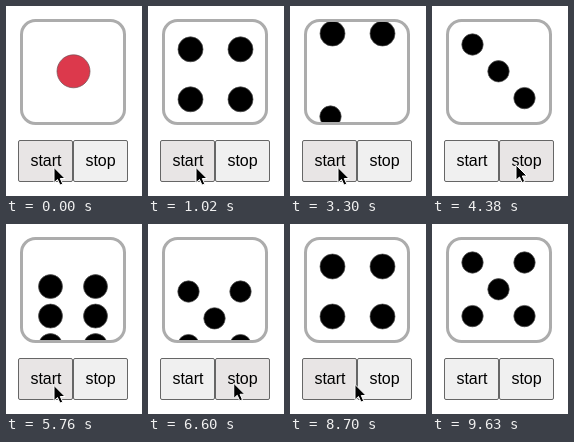
Write an HTML page that moves like this. It is 136 px wide and 190 px high and loops after 9.66 s.

```html
<!DOCTYPE html>
<html lang="en">
<head>
<meta charset="utf-8">
<title>Dice roller</title>
<style>
  html, body { margin: 0; width: 100%; height: 100%; overflow: hidden; background: #fff; }
  svg { position: absolute; left: 0; top: 0; display: block; }
  text { font: 16px "Liberation Sans", Arial, sans-serif; fill: #000; }
  .button { fill: #f0f0f0; stroke: #666; }
  .button.hover { fill: #e8e5e5; }
</style>
</head>
<body>
<svg width="136" height="190" viewBox="0 0 136 190">
  <defs>
    <clipPath id="window"><rect x="17" y="16" width="100" height="100" rx="12"/></clipPath>
  </defs>
  <rect x="15.5" y="14.5" width="103" height="103" rx="14" fill="#fff" stroke="#acacac" stroke-width="3"/>
  <g clip-path="url(#window)"><g id="strip"></g></g>
  <rect id="start" class="button" x="12.5" y="134.5" width="54" height="41" rx="1.5"/>
  <rect id="stop" class="button" x="67.5" y="134.5" width="54" height="41" rx="1.5"/>
  <text x="24.4" y="160">start</text>
  <text x="79.4" y="160">stop</text>
  <path id="cursor" d="M0 0V15.2L3.5 12L6 17.6L8.7 16.4L6.3 11H11Z" fill="#000" stroke="#fff" stroke-linejoin="round"/>
</svg>
<script>
const LOOP = 9660, GAP = 137, SPIN = 1000;
const HOME = { x: 48, y: 161.5 };
const $ = id => document.getElementById(id);
const strip = $('strip'), cursor = $('cursor');

// Each roll: start and stop times, resulting face, pointer x on stop, time it leaves.
const rolls = [
  { start: 520, stop: 2010, face: 6, reach: 102, leave: 2180 },
  { start: 2880, stop: 3840, face: 3, reach: 84, leave: 4390 },
  { start: 4899, stop: 6800, face: 2, reach: 90, leave: 7000 },
  { start: 7796, stop: 8500, face: 4, reach: 90, leave: 8560 },
  { start: 8970, stop: 9450, face: 5, reach: 92, leave: 9460 }
];

const mix = (a, b, k) => a + (b - a) * k;
function ease(t, from, length) {
  const k = Math.min(1, Math.max(0, (t - from) / length));
  return k * k * (3 - 2 * k);
}

// Pip positions as steps away from the middle of the face.
function pips(n) {
  const list = [];
  if (n % 2) list.push([0, 0]);
  if (n > 1) list.push([-1, -1], [1, 1]);
  if (n > 3) list.push([1, -1], [-1, 1]);
  if (n === 6) list.push([-1, 0], [1, 0]);
  return list;
}

const plain = { x: 66.5, y: 65.3, dx: 26, dy: 26.8, r: 10.7 };
const layouts = {
  1: { ...plain, x: 67.5, r: 16.5 },
  4: { x: 67.5, y: 67.5, dx: 25, dy: 25, r: 12.5 },
  6: { x: 67, y: 68.5, dx: 22.5, dy: 29.5, r: 12 }
};

function addFace(n, level) {
  const { x, y, dx, dy, r } = layouts[n] || plain;
  const [fill, stroke] = n === 1 ? ['#dc394c', '#6f5055'] : ['#000', '#555'];
  for (const [i, j] of pips(n)) {
    const dot = document.createElementNS('http://www.w3.org/2000/svg', 'circle');
    const look = { cx: x + i * dx, cy: y + j * dy - level * GAP, r, fill, stroke, 'stroke-width': 0.7 };
    for (const key in look) dot.setAttribute(key, look[key]);
    strip.append(dot);
  }
}

// Faces are stacked upwards, with the first repeated for a seamless wrap.
for (let i = 0; i <= 6; i++) addFace(i % 6 + 1, i);

function stripOffset(t) {
  const roll = rolls.findLast(r => t >= r.start);
  if (!roll) return 0;
  if (t >= roll.stop) return (roll.face - 1) * GAP;
  return (t - roll.start) % SPIN / SPIN * 6 * GAP;
}

// The pointer crosses to stop before each click, then returns; last it drops away.
function pointer(t) {
  const roll = rolls.find(r => t < r.leave + 250) || rolls[rolls.length - 1];
  const last = roll === rolls[rolls.length - 1];
  const over = ease(t, roll.stop - 480, 350);
  const away = ease(t, roll.leave, last ? 160 : 250);
  const top = mix(HOME.y, 159, over);
  if (last) return [mix(HOME.x, roll.reach, over), mix(top, 195, away)];
  return [mix(HOME.x, roll.reach, over * (1 - away)), mix(top, HOME.y, away)];
}

function draw(now) {
  const t = now % LOOP;
  const [x, y] = pointer(t);
  const inRow = y >= 134 && y < 176;
  strip.setAttribute('transform', `translate(0 ${stripOffset(t)})`);
  cursor.setAttribute('transform', `translate(${x} ${y})`);
  $('start').classList.toggle('hover', inRow && x < 67);
  $('stop').classList.toggle('hover', inRow && x >= 67);
}

const begin = performance.now();
function tick() {
  draw(performance.now() - begin);
  requestAnimationFrame(tick);
}
tick();
</script>
</body>
</html>
```
